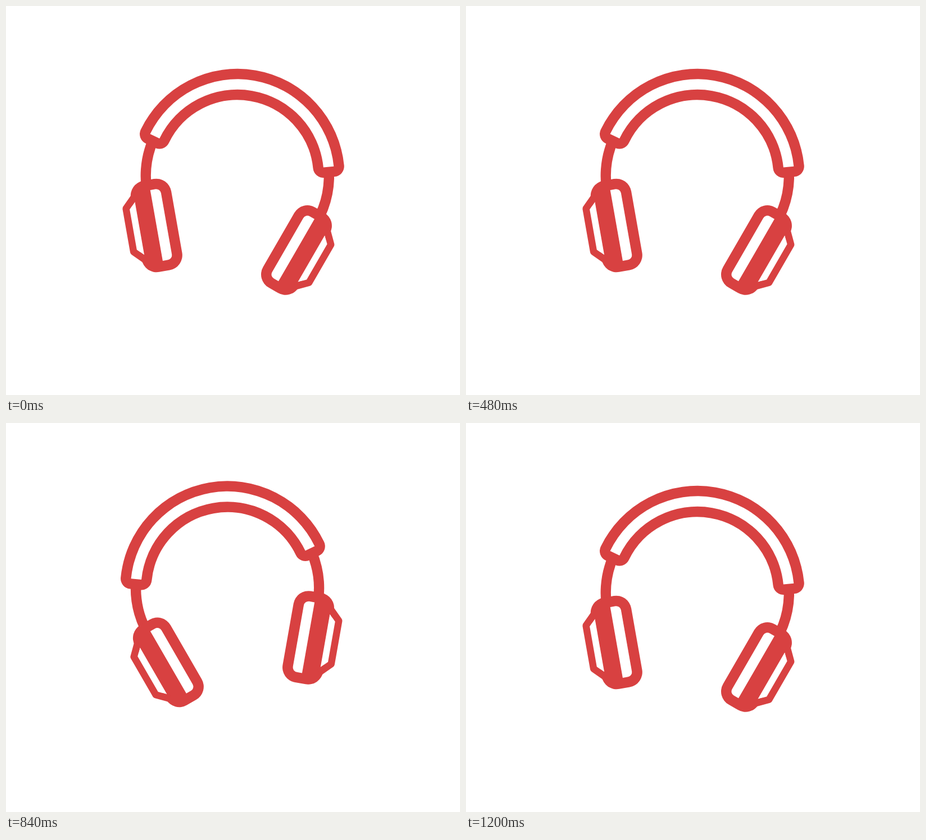
Recreate the animation shown at these times as an HTML page. Size 808x693 px, loop 1580 ms.

```html
<!DOCTYPE html>
<html lang="en">
<head>
<meta charset="utf-8">
<title>Headphones</title>
<style>
  html, body { margin: 0; width: 100%; height: 100%; overflow: hidden; background: #fff; }
  svg { display: block; width: 808px; height: 693px; }
</style>
</head>
<body>
<svg viewBox="0 0 808 693">
  <defs>
    <g id="cup">
      <rect x="-36.5" y="-82.5" width="73" height="165" rx="27" fill="#d84141"/>
      <path d="M0-64H9.5A8.5 8.5 0 0 1 18-55.5V55.5A8.5 8.5 0 0 1 9.5 64H0Z" fill="#fff"/>
      <path d="M-30.5-48L-42-36.5V36.5L-30.5 48Z" fill="#fff"/>
      <path d="M-30-57.3L-48.2-39.1V39.1L-30 57.3" fill="none" stroke="#d84141" stroke-width="12.4" stroke-linejoin="round"/>
    </g>
    <g id="side">
      <path id="stem" fill="none" stroke="#d84141" stroke-width="18.5"/>
      <use href="#cup" transform="translate(-126.5 112) rotate(-20)"/>
    </g>
  </defs>
  <g id="phones">
    <use href="#side"/>
    <use href="#side" transform="scale(-1 1)"/>
    <path id="band" fill="#fff" stroke="#d84141" stroke-width="37" stroke-linejoin="round" paint-order="stroke"/>
  </g>
</svg>
<script>
const STEP = 30, SWING = 240, ACTIVE = 1200, LOOP = 1580;
const TILT = 10;
const PIVOT = [378.8, 348.9], CENTER = [403.3, 297.6];
const $ = id => document.getElementById(id);

// Point on a circle around the headband centre; angle in degrees above the left horizontal
const at = (r, deg) => {
  const a = deg * Math.PI / 180;
  return `${-r * Math.cos(a)} ${-r * Math.sin(a)}`;
};
const arc = (r, to, sweep) => `A${r} ${r} 0 0 ${sweep} ${at(r, to)}`;

const END = 15.65, OUTER = 172.3, INNER = 153.8, STEM = 163;
$('band').setAttribute('d',
  `M${at(OUTER, END)}${arc(OUTER, 180 - END, 1)}L${at(INNER, 180 - END)}${arc(INNER, END, 0)}Z`);
$('stem').setAttribute('d', `M${at(STEM, 13)}${arc(STEM, -25, 0)}`);

function draw(ms) {
  const t = Math.min(Math.floor(ms % LOOP / STEP) * STEP, ACTIVE);
  const angle = TILT * Math.cos(2 * Math.PI * t / SWING);
  $('phones').setAttribute('transform', `rotate(${angle} ${PIVOT}) translate(${CENTER})`);
}

let start;
function tick(now) {
  start ??= now;
  draw(now - start);
  requestAnimationFrame(tick);
}
draw(0);
requestAnimationFrame(tick);
</script>
</body>
</html>
```
